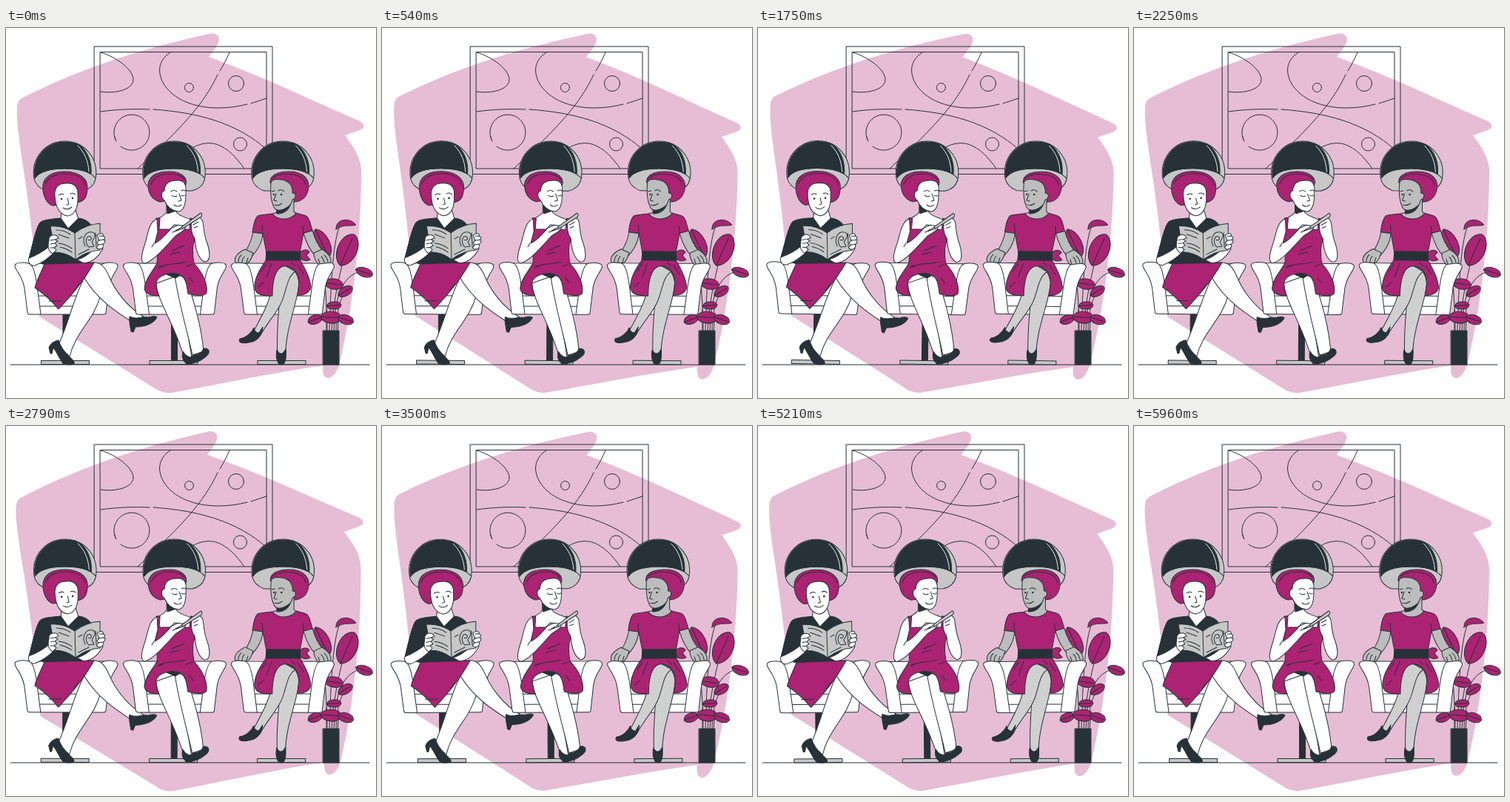
Recreate the animation shown at these times as an HTML page. Size 500x500 px, loop 6000 ms.

```html
<!DOCTYPE html>
<html lang="en">
<head>
<meta charset="utf-8">
<title>Salon</title>
<style>
html, body { margin: 0; width: 100%; height: 100%; overflow: hidden; background: #fff }
svg { display: block; width: 100vw; height: 100vh }
path, rect, circle, ellipse { stroke: #263238; stroke-width: 1; stroke-linejoin: round; stroke-linecap: round; fill: none }
.d { fill: #263238 }
.p { fill: #ab2372 }
.g { fill: #c7c7c7 }
.skin { fill: #bdbdbd }
.tights { fill: #d0d0d0 }
.w { fill: #fff }
.dot { fill: #263238; stroke: none }
.shine { stroke: #fff; stroke-width: .9 }
#blob { fill: #e6bdd4; stroke: none }
</style>
</head>
<body>
<svg viewBox="0 0 500 500">
<defs>
  <g id="chair">
    <rect class="d" x="77" y="386" width="8" height="64"/>
    <rect class="g" x="47.500" y="449.500" width="65" height="5"/>
    <path class="w" d="M12 322C11 317 22 316 31 318H132C141 316 152 317 151 322C150 329 142 334 139 350L135 385Q135 387 132 387H32Q29 387 29 384L25 352C22 334 14 330 12 322Z"/>
    <path d="M31 318C38 320 41 338 43 356L47 387M132 318C125 320 122 338 120 356L116 387M44 362H119M46 376H117"/>
  </g>
  <g id="dryer">
    <path class="g" d="M38 204C33 174 55 153 79.500 153C104 153 126 174 121 204C119 213 112 218 104 220H54C46 217 40 212 38 204Z"/>
    <path class="d" d="M39 203C35 174 56 154 79.500 154C89 154 97 156 102 160C111 169 116 182 115 197C106 192 93 190 79.500 190C60 190 45 194 39 203Z"/>
    <path class="shine" d="M97 159C106 168 111 179 112 194"/>
    <path d="M39 203C45 194 60 190 79.500 190C99 190 114 194 121 203"/>
  </g>
</defs>

<path id="blob" d="M23 94C110 50 190 27 274 8C284 5 290 12 287 19C285 26 279 32 274 39C345 65 410 96 478 126C486 130 485 135 478 138L458 145C468 159 479 173 480 192C480 275 470 372 451 452C448 465 441 473 435 473C428 472 428 465 428 456C355 467 290 481 223 493Q214 494 206 490C150 455 95 421 45 390C42 330 33 250 22 180C17 145 14 125 15 106Q16 97 23 94Z"/>

<rect x="119.500" y="25" width="240.500" height="172.500"/>
<rect x="127.500" y="32.500" width="224.500" height="157.500"/>
<path d="M128 33C149 39 172 56 172 70C171 84 147 89 128 86M222 33C205 44 204 61 214 77C231 102 264 108 287 108C302 108 314 106 326 103M331 102L352 95M302 33C298 42 294 50 289 58M286 63C267 104 236 136 178 190M128 113C149 110 172 109 194 110M199 110C258 114 312 128 352 164M240 172C252 158 270 153 284 157C300 162 312 176 322 190"/>
<path d="M149 153A24 24 0 1 1 155 160M147 147L148 151"/>
<circle cx="247.500" cy="80.500" r="6"/><circle cx="311" cy="75" r="10.500"/><circle cx="316.500" cy="157" r="9"/>

<path d="M6 455H491"/>

<g id="plant">
  <path d="M434 410C434 370 430 330 425 288M437 410C439 350 441 295 450 270M440 410C443 360 452 330 461 292M443 410C445 370 450 340 475 330M446 410C446 390 450 365 460 356M433 410V380M448 410L450 385"/>
  <path class="p" d="M446 272C445 258 464 255 473 266C464 269 458 264 446 272Z"/>
</g>

<g class="sway" data-x="108">
  <use href="#chair"/><use href="#dryer"/>
  <path class="p" d="M63 240C52 236 49 221 50 212C52 199 65 194 80 194C97 194 109 202 110 214C110 227 107 234 96 236Z"/>
  <path d="M53 211C58 200 70 197 81 197C94 197 104 202 107 212"/>
  <path class="w" d="M75 247L74 258L84 273L98 259L94 246Z"/>
  <path class="w" d="M66 227C65 214 72 210 81 210C91 209 98 214 97 226C98 240 94 253 83 254C72 252 67 242 66 227Z"/>
  <path d="M71 226Q74 223 78 225M87 224Q91 222 94 225M83 230L85 238L82 239M77 243Q83 247 89 242"/>
  <circle class="dot" cx="75" cy="231" r="1.300"/><circle class="dot" cx="90" cy="230" r="1.300"/>
  <path class="d" d="M74 257C62 258 50 259 46 263C40 270 36 293 31 311L50 319H112L122 290C121 275 116 259 98 257L84 271Z"/>
  <path class="w" d="M31 311C29 317 33 322 39 321C50 317 58 310 66 303L61 293C52 301 42 307 31 311Z"/>
  <path class="w" d="M96 313C107 310 117 302 122 293L131 298C125 309 116 317 105 318Z"/>
  <path class="w" d="M108 333C93 360 88 388 72 426C73 435 79 441 86 444C94 410 120 394 128 360Z"/>
  <path class="d" d="M71 422C65 423 60 427 58 432L60 440H62L64 432C70 440 73 449 78 454Q86 456 92 454C94 450 87 447 84 442C79 438 74 431 71 422Z"/>
  <path class="w" d="M117 317C129 316 134 324 139 335C146 352 162 376 186 390L170 397C151 385 124 368 106 338Z"/>
  <path class="d" d="M167 390C177 395 184 389 192 391Q202 388 204 391C199 400 187 404 175 404L172 411L169 410C168 403 166 396 167 390Z"/>
  <path class="p" d="M52 319C46 333 41 342 39 351C50 358 61 368 71 380C91 359 108 337 119 317Z"/>
  <path d="M58 369H75M99 346L92 355"/>
  <path class="g" d="M60 268C72 267 84 271 93 277C102 270 114 265 127 264V300C115 301 103 306 94 313C85 306 75 303 66 303Z"/>
  <path d="M93 277L94 313M68 273Q79 273 87 279M71 279L85 284M71 291Q81 292 89 298M73 296Q82 298 89 303M98 285L103 282M98 306L112 299M107 295C102 285 107 274 117 276C123 278 119 285 116 289L119 295L112 296C106 291 108 279 114 282C118 285 113 288 111 286M121 277L122 295"/>
  <path class="w" d="M58 287C57 281 64 278 69 281L71 284L66 286L70 288L66 291L69 294L65 297L68 300L63 305C57 301 56 296 58 287Z"/>
  <path d="M60 287L65 286M60 292L65 291M60 297L65 297"/>
  <path class="w" d="M123 280C128 276 132 277 131 281C135 282 134 285 132 286C135 287 134 291 131 292C133 295 130 299 126 299L122 297L125 293L123 290L126 287Z"/>
  <path d="M126 281L131 281M125 287L132 286M125 293L131 292"/>
</g>

<g class="sway" data-x="228">
  <use href="#chair" x="146.500"/><use href="#dryer" x="147.500"/>
  <path class="p" d="M208 235C195 231 192 220 192 211C194 198 207 194 221 194C236 194 246 202 243 212L219 233Z"/>
  <path d="M196 211C200 200 211 197 222 197C232 197 239 201 241 205"/>
  <path class="w" d="M217 232L217 249C212 256 204 257 199 262L207 282H251L254 263C250 256 237 257 230 249V238Z"/>
  <path class="d" d="M217 233C218 242 224 247 230 247L218 251Z"/>
  <path class="w" d="M214 220C214 211 220 206 231 206C241 205 244 211 243 224C243 237 241 247 233 248C223 247 217 240 214 233C209 230 209 221 214 220Z"/>
  <path d="M223 221Q227 218 231 221M237 220Q240 218 243 220M224 226Q227 229 231 227M237 226Q240 228 242 226M234 224L237 233L233 234M227 239Q232 243 237 239"/>
  <path class="w" d="M203 345C204 368 228 401 240 443L251 446C245 404 235 362 231 335Z"/>
  <path class="w" d="M228 334C233 370 244 406 252 442L267 437C264 402 254 370 243 336Z"/>
  <path class="d" d="M239 437C237 446 240 452 247 454C253 454 256 449 253 444C249 446 243 444 239 437Z"/>
  <path class="d" d="M267 433C275 432 277 439 270 444C262 451 252 454 243 454C243 450 249 448 253 442C260 442 265 439 267 433Z"/>
  <path class="p" d="M203 257H208L207 272H248L249 257L253 258L255 286C251 296 252 307 254 318C266 331 273 346 271 358C267 364 254 361 246 359C244 348 244 339 236 334C223 329 206 333 203 344C203 352 204 358 207 362C196 362 188 360 187 352C188 339 199 328 204 318C206 306 201 292 202 281Z"/>
  <path class="d" d="M217 333Q227 330 235 334L229 338Z"/>
  <path d="M207 323C220 317 231 320 242 316M224 301L241 294M222 306L235 303M206 324L212 322M244 322L252 319M248 337L253 344"/>
  <path class="w" d="M204 258C193 262 192 278 188 291C183 306 181 316 187 318C199 317 221 289 229 281L238 275C244 270 244 266 239 267L227 266C219 277 208 288 201 291L205 275Z"/>
  <path d="M222 271L233 266M225 276L239 271M229 274L240 268M200 291L197 296"/>
  <path class="w" d="M252 258C256 254 264 255 266 262C268 276 268 282 272 291C276 304 277 316 268 316C259 311 256 297 255 284C250 278 249 266 252 258Z"/>
  <path d="M252 262L259 258M253 266L260 262M254 270L259 268"/>
  <path class="g" d="M237 269L263 250Q266 251 264 255L239 271Z"/>
</g>

<g class="sway" data-x="373">
  <use href="#chair" x="292.500"/><use href="#dryer" x="294.500"/>
  <path class="p" d="M357 209C356 198 369 194 383 194C399 194 409 202 409 214C408 227 401 235 388 235Z"/>
  <path d="M360 203C369 196 380 197 388 198C399 200 404 205 405 212"/>
  <path class="skin" d="M366 240L366 249L358 252L375 264L394 252L389 248V230Z"/>
  <path class="d" d="M366 245C373 247 380 243 385 237C382 246 375 251 366 251Z"/>
  <path class="skin" d="M358 209C357 221 358 234 362 242C365 248 373 247 379 243C385 240 386 236 387 232C393 230 392 222 387 223C388 212 381 206 372 205C365 204 359 205 358 209Z"/>
  <path d="M359 221L363 220M368 220Q372 217 376 221M365 224L362 233L366 234M363 239Q368 241 373 237"/>
  <circle class="dot" cx="362" cy="225" r="1.200"/><circle class="dot" cx="372" cy="225" r="1.300"/>
  <path class="skin" d="M334 275L347 277C346 291 340 300 332 309L322 304C328 296 332 286 334 275Z"/>
  <path class="skin" d="M402 277L414 273C417 284 421 293 428 301L419 309C410 300 405 288 402 277Z"/>
  <path class="skin" d="M310 317C307 309 315 303 323 299L334 304C332 311 330 316 326 318Z"/>
  <path d="M314 316Q314 310 318 307M319 317Q319 312 322 309M325 317L327 311"/>
  <path class="skin" d="M416 304L427 299C435 304 440 309 439 317L422 319C418 315 416 310 416 304Z"/>
  <path d="M435 316Q434 310 430 307M430 317Q429 311 426 309M424 318L422 312"/>
  <path class="p" d="M396 305C400 298 408 299 410 303L406 307L411 313C404 316 399 314 396 309Z"/>
  <path class="tights" d="M368 325C374 358 364 400 367 441L378 439C378 406 394 371 396 346C395 331 387 322 376 321Z"/>
  <path class="d" d="M366 435C364 446 367 455 372 455C378 455 379 446 378 434C374 442 370 442 366 435Z"/>
  <path class="tights" d="M377 321C366 322 362 334 360 347C357 371 343 394 334 411L344 415C353 397 371 381 376 360C380 348 381 336 391 329Z"/>
  <path class="d" d="M335 405C332 412 324 419 316 420C313 425 319 427 328 425C337 424 346 418 347 404L342 412Q336 412 335 405Z"/>
  <path class="p" d="M360 251C353 252 346 252 340 254C335 259 334 269 333 276L347 278L352 304H397L402 277L414 274C411 263 410 255 403 253L392 250C385 260 368 261 360 251Z"/>
  <path d="M347 278L346 266M402 277L401 267"/>
  <path class="p" d="M352 313C343 325 335 339 336 352C338 362 350 362 360 362C360 344 363 326 374 322C386 320 395 329 396 343L394 361C402 362 411 358 412 350C411 337 403 323 397 313Z"/>
  <path d="M352 318L345 329M359 318L352 337M394 320L402 332M386 317L391 322M341 350L348 344"/>
  <path class="d" d="M352 302H397L398 314H351Z"/>
</g>

<rect class="d" x="428.500" y="409" width="21.500" height="46"/>
</svg>
<script>
const plant = document.getElementById('plant');
const blob = document.getElementById('blob');
const sitters = document.querySelectorAll('.sway');

// centre x, centre y, half length, half width, angle
const leaves = [
  [427, 291, 21, 10, 65], [461, 300, 23, 13, -66],
  [484, 330, 12, 6, 18], [458.5, 356, 11, 6, -30], [443, 346, 13, 7, 8],
  [443, 375, 10, 5, -4], [417.5, 394, 10, 6, -20], [439, 391, 14, 8, 4],
  [459, 394, 11, 6, 18]
];
plant.innerHTML += leaves.map(([x, y, l, w, a]) =>
  `<g transform="translate(${x} ${y}) rotate(${a})">
    <path class="p" d="M${-l} 0C${-l * .7} ${-w * 1.35} ${l * .8} ${-w * 1.35} ${l} 0C${l * .8} ${w * 1.35} ${-l * .7} ${w * 1.35} ${-l} 0Z"/>
    <path d="M${-l} 0H${l * .75}"/></g>`).join('');

// Triangle wave: 0, 1, 0, -1, 0 degrees over one period
function wind(t, period) {
  const p = t % period / period * 4;
  return p < 1 ? p : p < 3 ? 2 - p : p - 4;
}

function turn(el, angle, x, y) {
  el.setAttribute('transform', `rotate(${angle} ${x} ${y})`);
}

function draw() {
  const t = performance.now() % 6000;
  turn(blob, wind(t, 1500), 250, 250);
  for (const el of sitters) turn(el, wind(t, 6000), el.dataset.x, 304);
  requestAnimationFrame(draw);
}
draw();
</script>
</body>
</html>
```
